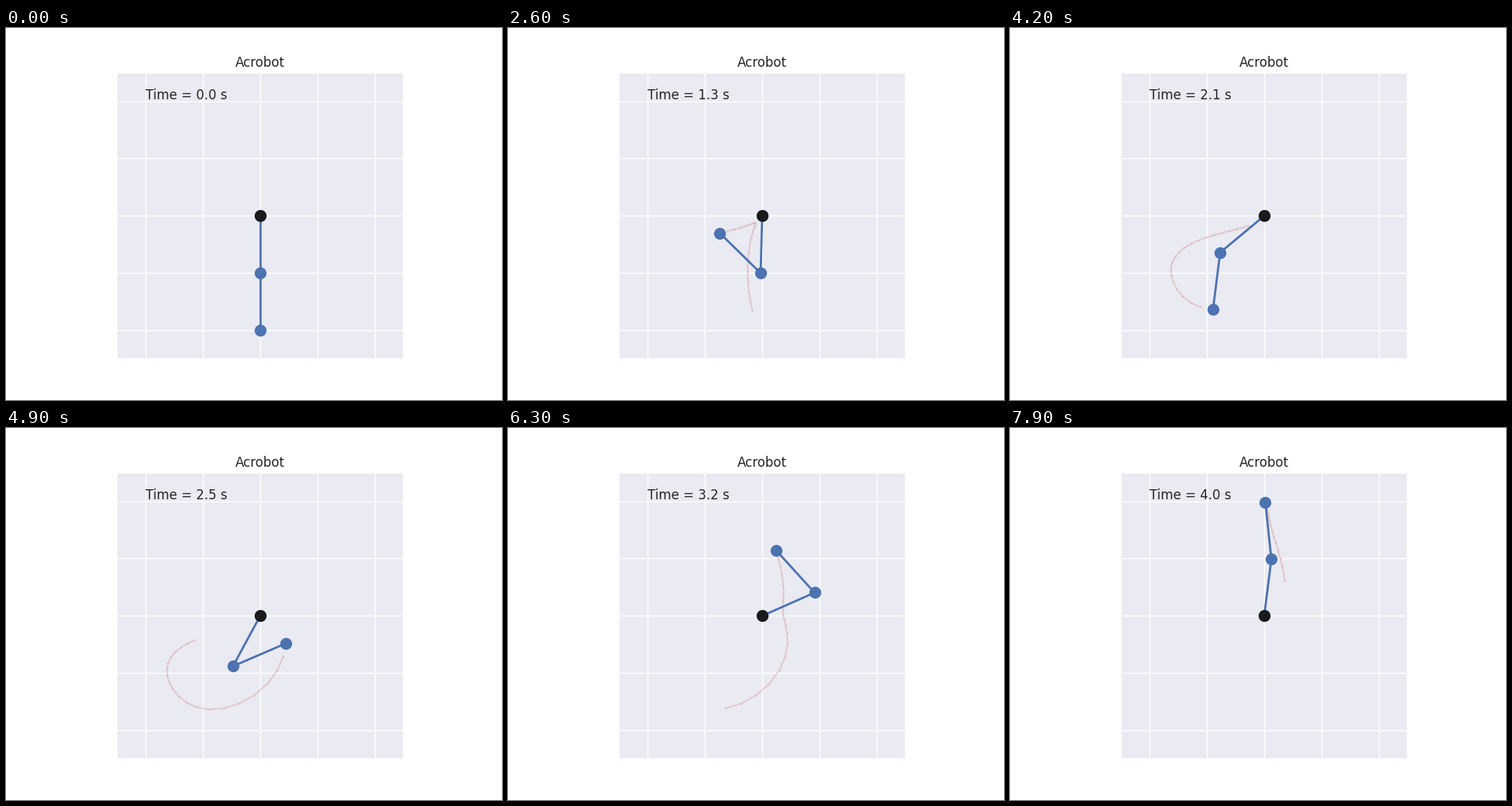
A matplotlib script for the animation above (8000 ms loop, 640x480 px).

```python
import numpy as np
import matplotlib.pyplot as plt
from matplotlib.animation import FuncAnimation

FRAMES, STEP, TAIL, GAP = 80, 0.05, 20, 5
BLUE, RED, BLACK, INK = "#4C72B0", "#C44E52", "#1a1a1a", "#262626"

# Link angles in degrees from straight down, one key pose every GAP steps.
UPPER = [0, 22, 45.2, 50.3, 33.3, 4.2, -22.2, -39.9, -46.9,
         -50.4, -19.2, 38.4, 89.5, 127.5, 152, 165.5, 174.5]
LOWER = [0, -30.5, -74.5, -111.3, -134.8, -137, -116, -81, -34,
         41.5, 130.2, 195, 221.3, 218.8, 203.8, 192.3, 184.7]


def swing(keys):
    """Cubic spline through evenly spaced key poses, starting from rest."""
    y = np.array([keys[1], *keys])  # mirrored first key gives zero speed
    n = len(y)
    m = np.zeros(n)
    system = 4 * np.eye(n - 2) + np.eye(n - 2, k=1) + np.eye(n - 2, k=-1)
    m[1:-1] = np.linalg.solve(system, 6 * np.diff(y, 2))
    t = np.arange(FRAMES) / GAP + 1
    k = t.astype(int)
    b = t - k
    a = 1 - b
    return np.radians(a * y[k] + b * y[k + 1]
                      + ((a**3 - a) * m[k] + (b**3 - b) * m[k + 1]) / 6)


upper, lower = swing(UPPER), swing(LOWER)
elbow_x, elbow_y = np.sin(upper), -np.cos(upper)
tip_x, tip_y = elbow_x + np.sin(lower), elbow_y - np.cos(lower)

plt.rcParams["font.family"] = "DejaVu Sans"
fig = plt.figure(figsize=(6.4, 4.8), dpi=100, facecolor="white")
ax = fig.add_axes([0.125, 0.11, 0.775, 0.77], facecolor="#EAEAF2")
ax.set(xlim=(-2.5, 2.5), ylim=(-2.5, 2.5), aspect="equal",
       xticks=range(-2, 3), yticks=range(-2, 3))
ax.set_axisbelow(True)
ax.grid(color="white", lw=1)
ax.tick_params(length=0, labelbottom=False, labelleft=False)
for side in ax.spines.values():
    side.set(color="white", linewidth=1.25)
ax.set_title("Acrobot", fontsize=12, color=INK, pad=5.3)

trail, = ax.plot([], [], ".-", color=RED, lw=1.5, ms=1, alpha=0.2)
arm, = ax.plot([], [], "o-", color=BLUE, lw=2, ms=10)
ax.plot([0], [0], "o", color=BLACK, ms=10)
clock = ax.text(-2, 2.037, "", fontsize=12, color=INK)


def draw(i):
    arm.set_data([0, elbow_x[i], tip_x[i]], [0, elbow_y[i], tip_y[i]])
    # The trail only shows once a full tail of positions exists.
    past = slice(i - TAIL, i) if i >= TAIL else slice(0, 0)
    trail.set_data(tip_x[past], tip_y[past])
    clock.set_text(f"Time = {i * STEP:.1f} s")
    return trail, arm, clock


anim = FuncAnimation(fig, draw, frames=FRAMES, interval=100,
                     repeat=True, repeat_delay=0)
plt.show()
```
